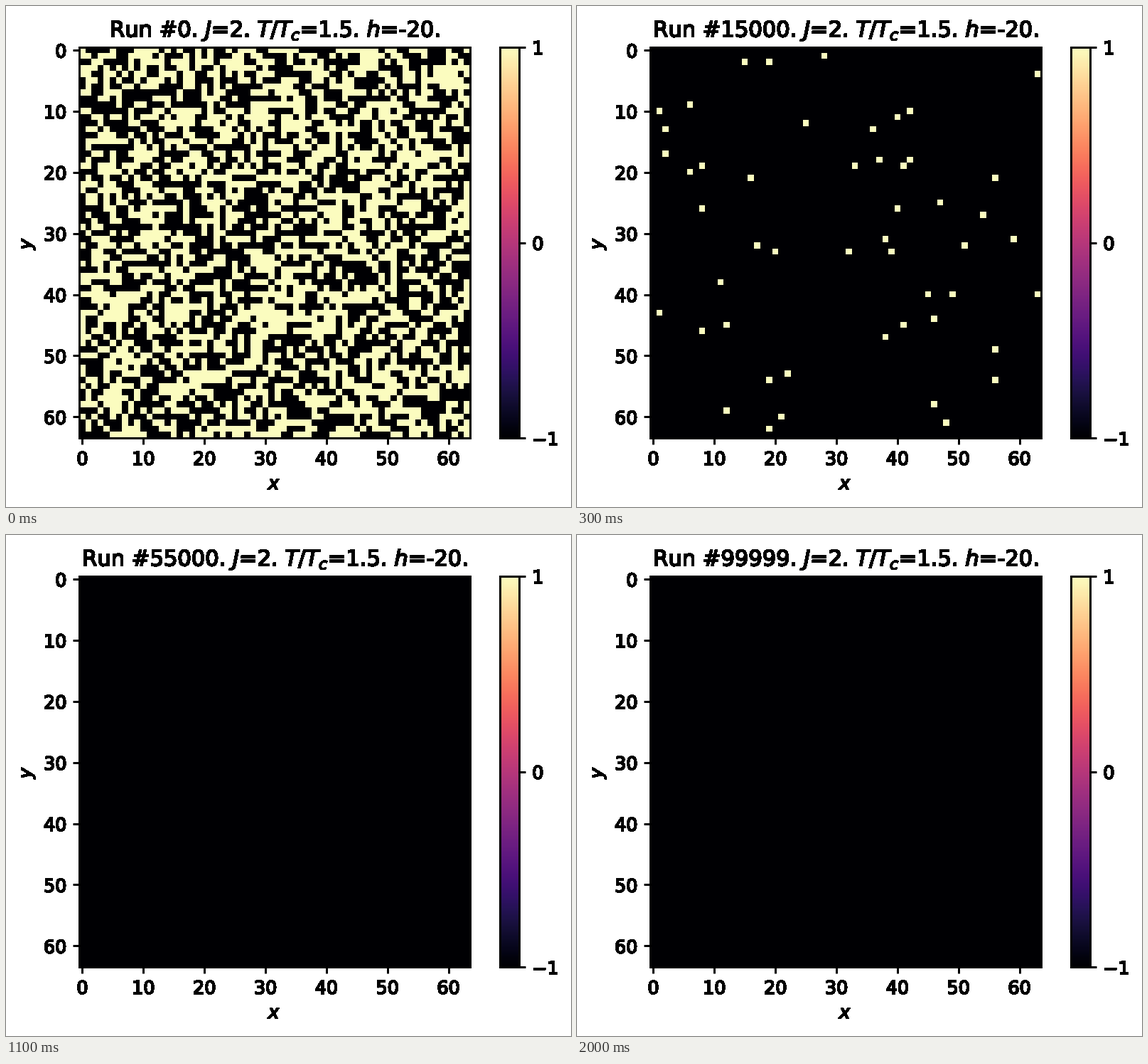
A matplotlib script for the animation above (2.1 s loop, 795 by 704 pixels).

```python
import matplotlib.pyplot as plt
import numpy as np
from matplotlib.animation import FuncAnimation
from matplotlib.patheffects import Stroke
from matplotlib.text import Text

W, H, DPI = 795, 704, 100
PX = 72 / DPI           # one pixel in points
SCALE = 1.833           # enlarges the default text and tick sizes
LINE = 3 * PX

N = 64                  # lattice side
J, FIELD, T_RATIO = 2, -20, 1.5
TEMP = T_RATIO * 2 * J / np.log(1 + np.sqrt(2))
RUNS, STEP = 100_000, 5000


def simulate(seed):
    """Metropolis spin flips on a periodic lattice, one snapshot per STEP runs."""
    rng = np.random.default_rng(seed)
    spins = rng.choice([-1, 1], (N, N))
    sites = rng.integers(0, N, (RUNS, 2)).tolist()
    chance = rng.random(RUNS).tolist()
    shots = []
    for run, (y, x) in enumerate(sites):
        if run % STEP == 0:
            shots.append((run, spins.copy()))
        near = (spins[y - 1, x] + spins[(y + 1) % N, x]
                + spins[y, x - 1] + spins[y, (x + 1) % N])
        cost = 2 * spins[y, x] * (J * near + FIELD)
        if cost <= 0 or chance[run] < np.exp(-cost / TEMP):
            spins[y, x] *= -1
    shots.append((RUNS - 1, spins))
    return shots


def heading(run):
    return f"Run #{run}. $J$={J}. $T/T_c$={T_RATIO}. $h$={FIELD}."


def add_axes(left, top, width, height):
    return fig.add_axes([left / W, 1 - (top + height) / H, width / W, height / H])


sizes = ["font.size", "axes.titlepad", "axes.labelpad"]
sizes += [f"{a}tick.major.{p}" for a in "xy" for p in ("size", "pad")]
for key in sizes:
    plt.rcParams[key] *= SCALE
for key in ("axes.linewidth", "xtick.major.width", "ytick.major.width"):
    plt.rcParams[key] = LINE
plt.rcParams["font.family"] = "DejaVu Sans"

shots = simulate(seed=2)

fig = plt.figure(figsize=(W / DPI, H / DPI), dpi=DPI, facecolor="white")
TOP, SIDE = 57.8, 549.5
ax = add_axes(103.2, TOP, SIDE, SIDE)
cax = add_axes(695, TOP, SIDE / 20, SIDE)

image = ax.imshow(shots[0][1], cmap="magma", vmin=-1, vmax=1,
                  interpolation="nearest", aspect="auto")
ax.set(xlabel="$x$", ylabel="$y$",
       xticks=range(0, N, 10), yticks=range(0, N, 10))
title = ax.set_title(heading(0))
fig.colorbar(image, cax=cax, ticks=[-1, 0, 1])

# Heavy, hard-edged lettering
fig.canvas.draw()
for text in fig.findobj(Text):
    text.set_antialiased(False)
    text.set_path_effects([Stroke(linewidth=0.9 * PX, foreground="black",
                                  offset=(0, -0.7 * PX))])


def update(k):
    run, spins = shots[k]
    image.set_data(spins)
    title.set_text(heading(run))
    return image, title


anim = FuncAnimation(fig, update, frames=len(shots), interval=100, repeat=True)
plt.show()
```
